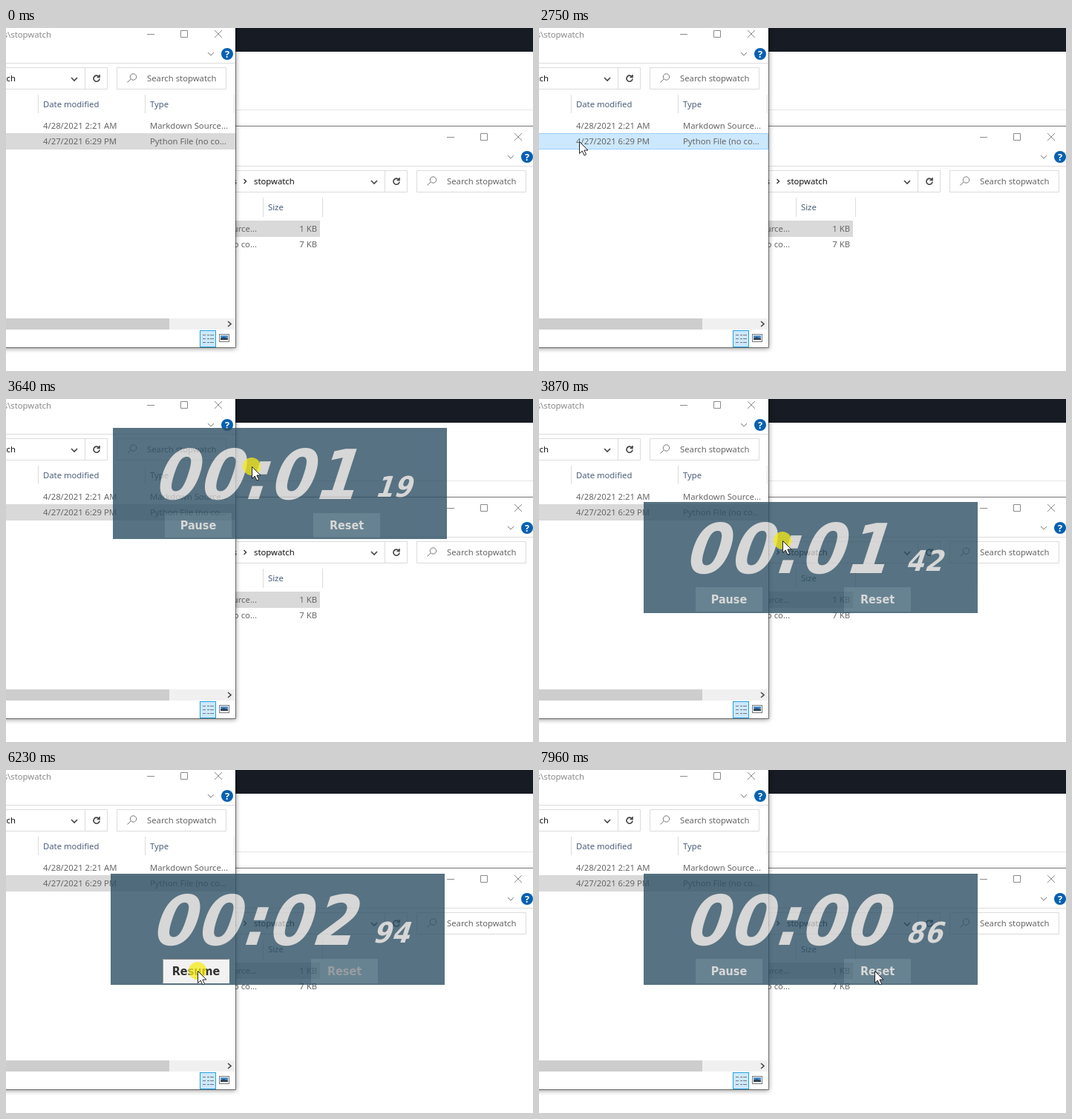
Recreate the animation shown at these times as an HTML page. Size 710x463 px, loop 8 s.

```html
<!DOCTYPE html>
<html lang="en">
<head>
<meta charset="utf-8">
<title>Stopwatch</title>
<style>
html, body { margin: 0; width: 100%; height: 100%; overflow: hidden; background: #fff; }
svg { display: block; width: 710px; height: 463px; font: 11.3px "Noto Sans", "Open Sans", sans-serif; fill: #666; }
.line { fill: none; stroke: #dcdcdc; }
.dark { fill: none; stroke: #444; stroke-width: 1.6; }
.thin { fill: none; stroke: #777; }
.edge { fill: none; stroke: #000; stroke-opacity: .45; }
.head { fill: #4c607a; }
.cap { fill: none; stroke: currentColor; }
.digits, .button { font: bold 93px "DejaVu Sans Condensed", "DejaVu Sans", sans-serif; font-stretch: condensed; }
.digits { fill: #cecece; letter-spacing: 2px; }
.digits .small { font-size: 38.5px; letter-spacing: 1px; }
.button { font-size: 16px; text-anchor: middle; }
.end { text-anchor: end; }
</style>
</head>
<body>
<svg viewBox="0 0 710 463">
  <defs>
    <filter id="soft" x="-20%" y="-20%" width="140%" height="140%"><feGaussianBlur stdDeviation="3"/></filter>
    <g id="chrome">
      <path class="cap" d="M190 8.500h10M235.500 3.500h9v9h-9zM281 3l10 10M291 3l-10 10"/>
      <path class="thin" d="M272 33l4 4 4-4"/>
      <circle cx="298" cy="35" r="8" fill="#0560b0"/>
      <text x="298" y="39.500" text-anchor="middle" font-size="13" font-weight="bold" fill="#fff">?</text>
      <path class="line" d="M-300 47.500H309M-200 53.500H136.500V82.500H-200M106.500 53V82M149.500 53.500h147v29h-147z"/>
      <path class="dark" d="M88 67l4 4 4-4M125 65.500a4 4 0 1 0 1 3M126 63v3.500h-3.500"/>
      <path class="thin" d="M168 69l-4.500 4.500"/>
      <circle class="thin" cx="171.500" cy="66" r="4.200"/>
      <text x="190" y="72">Search stopwatch</text>
    </g>
  </defs>

  <rect width="710" height="463" fill="#fff"/>
  <rect width="710" height="32" fill="#161b24"/>
  <path stroke="#e6e6e6" d="M0 110.500H710"/>

  <rect x="-20" y="134" width="734" height="400" opacity=".3" fill="#000" filter="url(#soft)"/>
  <rect x="-20" y="133" width="734" height="400" fill="#fff"/>
  <path class="edge" d="M0 132.500H710"/>
  <g color="#8a8a8a"><use href="#chrome" x="404" y="139"/></g>
  <g fill="#111"><text class="end" x="311" y="211">s</text><text x="334" y="211">stopwatch</text></g>
  <path class="dark" d="M320.500 204l3 3-3 3"/>
  <path class="line" d="M346.500 229v26M426.500 229v26"/>
  <text class="head" x="353" y="246">Size</text>
  <rect y="260" width="423" height="22" fill="#d9d9d9"/>
  <g class="end">
    <text x="338" y="275">Markdown Source...</text><text x="419" y="275">1 KB</text>
    <text x="338" y="296">Python File (no co...</text><text x="419" y="296">7 KB</text>
  </g>

  <rect id="shadow" x="-20" y="-20" width="330" height="453" fill="#000" filter="url(#soft)"/>
  <rect width="309" height="431" fill="#fff"/>
  <path class="edge" d="M309.500 0v431.500H0"/>
  <rect id="row" x="-2" y="142.500" width="310.500" height="21"/>
  <g id="title">
    <text class="end" x="61" y="13" fill="currentColor">s\stopwatch</text>
    <use href="#chrome"/>
  </g>
  <text class="end" x="13" y="72" fill="#111">stopwatch</text>
  <path class="line" d="M43.500 90v25M187.500 90v25M307.500 90v25"/>
  <g class="head"><text x="50" y="107">Date modified</text><text x="194" y="107">Type</text></g>
  <text x="50" y="136">4/28/2021 2:21 AM</text><text x="194" y="136">Markdown Source...</text>
  <text x="50" y="157">4/27/2021 6:29 PM</text><text x="194" y="157">Python File (no co...</text>
  <rect y="392" width="309" height="15" fill="#f0f0f0"/>
  <rect y="392" width="220" height="15" fill="#cdcdcd"/>
  <path class="dark" d="M299 396l4 3.500-4 3.500"/>
  <rect x="261.500" y="408.500" width="21" height="22" fill="#cce8ff" stroke="#26a0da"/>
  <path class="thin" stroke-dasharray="4 2 3 1 5" d="M265 414.500h15M265 419.500h15M265 424.500h15"/>
  <rect class="thin" x="287.500" y="413.500" width="13" height="10"/>
  <path fill="#4a90d0" d="M289 415h10v4h-10z"/>
  <path fill="#345" d="M289 419l4-2 6 2v2h-10z"/>

  <g id="watch" opacity=".8">
    <rect width="450" height="150" fill="#2e5064"/>
    <g class="digits">
      <text id="main" transform="translate(52 96) skewX(-18)"></text>
      <text id="hundredths" class="small" transform="translate(352.500 92.500) skewX(-18)"></text>
    </g>
    <g class="button">
      <rect id="pauseBox" x="70" y="115" width="90" height="33"/>
      <path id="sunken" class="thin" d="M70.500 147.500v-32h89"/>
      <text id="pause" x="115" y="137"></text>
      <rect id="resetBox" x="270" y="115" width="90" height="33"/>
      <text id="reset" x="315" y="137">Reset</text>
    </g>
  </g>

  <g id="cursor">
    <circle id="click" r="12" fill="#f5eb14" opacity=".75"/>
    <path fill="#fff" stroke="#222" d="M.5 .5v16l3.700-3.500 2.800 6 2.600-1.200-2.700-5.800h5.100z"/>
  </g>
</svg>
<script>
const $ = id => document.getElementById(id);
const LOOP = 8000, ENTER = 110, OPEN = 2790, GRAB = 3400, DROP = 3920;
const START = 2454.6, PAUSE = 5370, RESUME = 6330, RESET = 7103.6, RATE = 1.01;

// Pointer moves: begin, end, destination
const moves = [
  [ENTER, 340, 290, 383], [490, 670, 53, 383], [900, 950, 54, 153],
  [2800, 3080, 333, 39], [3480, 3890, 328, 192], [4300, 4700, 192, 212],
  [4800, 4980, 256, 248], [4980, 5150, 258, 271], [6350, 6950, 452, 271]
];

const clamp = (v, a, b) => Math.min(b, Math.max(a, v));
const within = (v, a, b) => v >= a && v < b;
const pad = n => String(Math.floor(n)).padStart(2, "0");
const set = (id, name, value) => $(id).setAttribute(name, value);
const place = (id, x, y) => set(id, "transform", `translate(${x} ${y})`);
const show = (id, on) => set(id, "visibility", on ? "visible" : "hidden");

function pointer(t) {
  let x = 587, y = 450;
  for (const [begin, end, toX, toY] of moves) {
    const p = clamp((t - begin) / (end - begin), 0, 1), ease = p * p * (3 - 2 * p);
    x += (toX - x) * ease;
    y += (toY - y) * ease;
  }
  return [Math.round(x), Math.round(y)];
}

function elapsed(t) {
  if (t >= RESET) return RATE * (t - RESET);
  return RATE * (Math.max(0, Math.min(t, PAUSE) - START) + Math.max(0, t - RESUME));
}

function button(name, pressed, disabled) {
  set(name + "Box", "fill", pressed ? "#f0f0f0" : "#426577");
  set(name, "fill", pressed ? "#000" : disabled ? "#82858a" : "#cecece");
}

function draw() {
  const t = Math.floor(performance.now() % LOOP / 10) * 10;
  const [x, y] = pointer(t);
  show("cursor", t >= ENTER);
  place("cursor", x, y);

  const active = within(t, 1790, 2700), hover = x < 309 && within(y, 142, 164);
  set("title", "color", active ? "#000" : "#8a8a8a");
  set("shadow", "opacity", active ? 0.55 : 0.4);
  set("row", "fill", hover ? "#cce8ff" : "#d9d9d9");
  set("row", "stroke", hover ? "#99d1ff" : "#d9d9d9");

  const [dragX, dragY] = pointer(clamp(t, GRAB, DROP));
  show("watch", t >= OPEN);
  place("watch", dragX - 187, dragY - 52);

  const ms = elapsed(t);
  $("main").textContent = pad(ms / 60000) + ":" + pad(ms / 1000 % 60);
  $("hundredths").textContent = pad(ms % 1000 / 10);

  const held = end => within(t, end - 100, end);
  const paused = within(t, PAUSE, RESUME), pressed = held(PAUSE) || held(RESUME);
  $("pause").textContent = paused ? "Resume" : "Pause";
  button("pause", pressed);
  button("reset", held(RESET), paused);
  show("sunken", t >= OPEN && pressed);
  show("click", t >= ENTER && (held(2380) || within(t, GRAB, DROP) || pressed || held(RESET)));
  requestAnimationFrame(draw);
}
draw();
</script>
</body>
</html>
```
